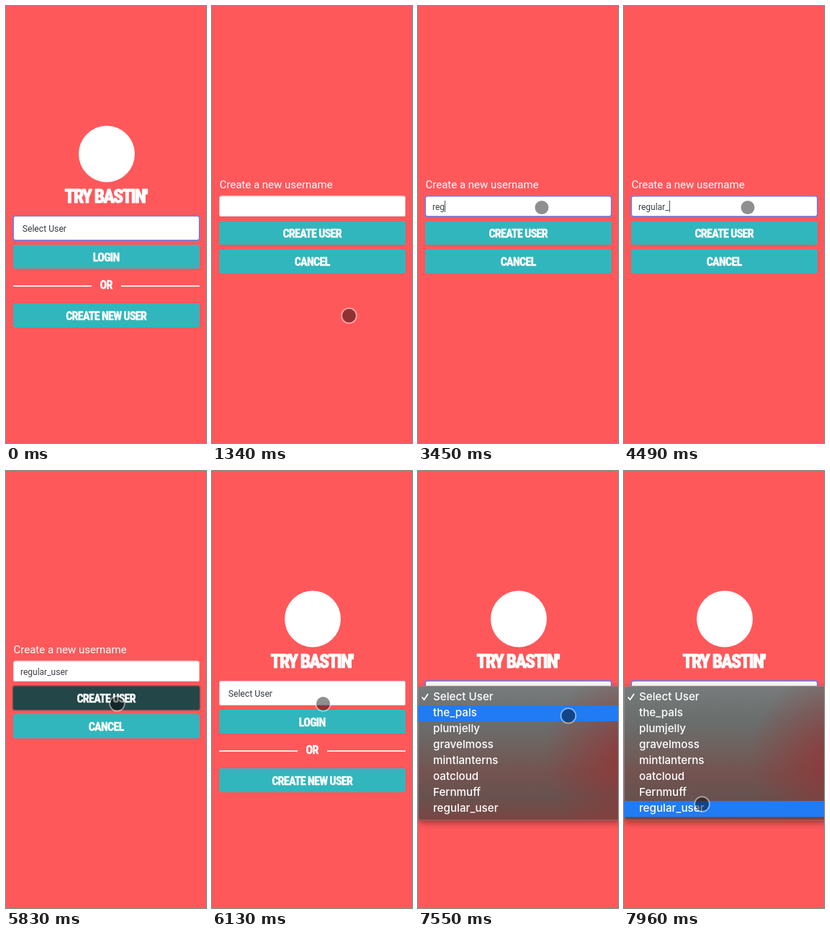
Write an HTML page with a canvas that moves like this. It is 278 by 604 pixels and loops after 8 s.

```html
<!DOCTYPE html>
<html lang="en">
<head>
<meta charset="utf-8">
<title>Login flow</title>
<style>
html, body { margin: 0; width: 100%; height: 100%; overflow: hidden; background: #ff585b; }
canvas { display: block; width: 278px; height: 604px; }
</style>
</head>
<body>
<canvas id="stage" width="278" height="604"></canvas>
<script>
const ctx = document.getElementById('stage').getContext('2d');
const LOOP = 8000;
const RED = '#ff585b', PRESSED = [35, 70, 72], IDLE = [49, 182, 189];
const LEFT = 10, WIDTH = 259;
const BODY = 'Roboto, sans-serif';
const NARROW = '"Roboto Condensed", "Open Sans Condensed", Roboto, sans-serif';

const USERNAME = 'regular_user';
const KEY_TIMES = [3120, 3300, 3450, 3630, 3720, 3900, 4080, 4190, 4670, 4850, 4940, 4940];
const OPTIONS = ['Select User', 'the_pals', 'plumjelly', 'gravelmoss', 'mintlanterns',
  'oatcloud', 'Fernmuff', USERNAME];
const ROW = 22, MENU_TOP = 297, FIRST_ROW = 302, MENU_BOTTOM = 483;

// Pointer moves: time span, then start, control and end points.
const MOVES = [
  { from: 570, to: 860, path: [[255, 470], [218, 450], [190.5, 428]] },
  { from: 1680, to: 2080, path: [[190.5, 428], [164, 355], [172, 278.5]] },
  { from: 5000, to: 5240, path: [[172, 278.5], [166, 306], [154.5, 321.5]] },
  { from: 6200, to: 6710, path: [[154.5, 321.5], [215, 352], [215.5, 321.5]] },
  { from: 7450, to: 7960, path: [[215.5, 321.5], [186, 405], [108.5, 460.5]] }
];

const clamp = v => Math.min(1, Math.max(0, v));
const ramp = (t, from, to) => clamp((t - from) / (to - from));
const smooth = u => u * u * (3 - 2 * u);
const mix = (a, b, u) => a + (b - a) * u;

function pointerAt(t) {
  const move = MOVES.filter(m => t >= m.from).pop();
  if (!move) return null;
  const u = smooth(ramp(t, move.from, move.to));
  const [a, b, c] = move.path;
  return [0, 1].map(i => mix(mix(a[i], b[i], u), mix(b[i], c[i], u), u));
}

function box(x, y, w, h, r, fill) {
  ctx.beginPath();
  ctx.roundRect(x, y, w, h, r);
  if (fill) {
    ctx.fillStyle = fill;
    ctx.fill();
  }
}

function outline(color, width) {
  ctx.lineWidth = width;
  ctx.strokeStyle = color;
  ctx.stroke();
}

function text(str, x, y, size, color = '#fff', family = BODY, weight = 400) {
  ctx.font = `${weight} ${size}px ${family}`;
  ctx.textAlign = 'left';
  ctx.fillStyle = color;
  ctx.fillText(str, x, y);
}

// Centred, tightly set heavy capitals in the narrow face.
function heading(str, cy, size, tracking, heft) {
  ctx.save();
  ctx.fontStretch = 'condensed';
  ctx.letterSpacing = `${tracking}px`;
  ctx.textAlign = 'center';
  ctx.fillStyle = '#fff';
  ctx.strokeStyle = '#fff';
  ctx.lineWidth = heft;
  ctx.lineJoin = 'round';
  ctx.font = `bold ${size}px ${NARROW}`;
  const x = 139.5 + tracking / 2, y = cy + size * 0.355;
  ctx.fillText(str, x, y);
  ctx.strokeText(str, x, y);
  ctx.restore();
}

const label = (str, cy) => heading(str, cy, 16, -0.7, 0.4);

function button(str, y, h, press = 0) {
  if (press > 0) box(LEFT - 1.5, y - 1.5, WIDTH + 3, h + 3, 4, `rgba(120,80,80,${0.75 * press})`);
  const rgb = IDLE.map((v, i) => Math.round(mix(v, PRESSED[i], press)));
  box(LEFT, y, WIDTH, h, 3, `rgb(${rgb})`);
  label(str, y + h / 2 + 0.4);
}

function field(y, h, focus) {
  box(LEFT, y, WIDTH, h, 3, '#fff');
  box(LEFT + 0.5, y + 0.5, WIDTH - 1, h - 1, 3);
  outline('#e3d5da', 1);
  if (focus > 0) {
    ctx.globalAlpha = focus;
    box(LEFT, y, WIDTH, h, 3);
    outline('#8b78cc', 2);
    ctx.globalAlpha = 1;
  }
}

function drawHome(t) {
  ctx.fillStyle = '#fff';
  ctx.beginPath();
  ctx.arc(140, 204.5, 39, 0, Math.PI * 2);
  ctx.fill();
  heading("TRY BASTIN'", 263, 25.5, -1.5, 1.2);

  field(290, 34, t < 1340 || t >= 7490 ? 1 : 0);
  text('Select User', 22.7, 312, 12.2, '#343a40');
  button('LOGIN', 330, 33);
  ctx.fillStyle = '#ffe3e3';
  ctx.fillRect(LEFT, 386, 109, 2);
  ctx.fillRect(160, 386, 109, 2);
  label('OR', 385);
  button('CREATE NEW USER', 411, 33);
  if (t >= 7130) drawMenu(t);
}

function drawForm(t) {
  text('Create a new username', 10.5, 251.5, 15);
  const focus = ramp(t, 2470, 2650) * (1 - ramp(t, 5740, 5830));
  field(262.5, 28.5, focus);

  const count = KEY_TIMES.filter(k => t >= k).length;
  const typed = USERNAME.slice(0, count);
  text(typed, 20, 282, 12, '#3c4147');
  const lastKey = count ? KEY_TIMES[count - 1] : 2470;
  const caretOn = t >= 2470 && t < 5770 && (t - lastKey) % 1000 < (count ? 500 : 540);
  if (caretOn) {
    ctx.fillStyle = '#555';
    ctx.fillRect(20 + Math.round(ctx.measureText(typed).width), 269, 1, 16);
  }

  const press = ramp(t, 5740, 5820) * (1 - ramp(t, 5890, 6030));
  button('CREATE USER', 297.5, 32.5, press);
  button('CANCEL', 336, 33.5);
}

function withStops(gradient, stops) {
  stops.forEach(([at, color]) => gradient.addColorStop(at, color));
  return gradient;
}

function drawMenu(t) {
  const height = MENU_BOTTOM - MENU_TOP;
  const shade = withStops(ctx.createLinearGradient(0, MENU_TOP, 0, MENU_BOTTOM), [
    [0, '#777b7b'], [0.25, '#6a6f6e'], [0.45, '#6e625f'], [0.65, '#735350'],
    [0.82, '#67524f'], [1, '#7a4542']
  ]);
  const glow = withStops(ctx.createRadialGradient(300, 395, 10, 300, 395, 125), [
    [0, 'rgba(150,48,48,.75)'], [1, 'rgba(150,48,48,0)']
  ]);
  ctx.save();
  ctx.shadowColor = 'rgba(0,0,0,.4)';
  ctx.shadowBlur = 10;
  ctx.shadowOffsetY = 3;
  box(0, MENU_TOP, 284, height, 5, shade);
  ctx.restore();
  box(0, MENU_TOP, 284, height, 5, glow);
  box(0.5, MENU_TOP + 0.5, 284, height - 1, 5);
  outline('rgba(190,150,150,.45)', 1);

  const hovered = Math.floor((pointerAt(t)[1] - FIRST_ROW) / ROW);
  ctx.fillStyle = '#217bf3';
  ctx.fillRect(0, FIRST_ROW + hovered * ROW, 278, ROW);
  OPTIONS.forEach((name, i) =>
    text(name, 21, 317 + i * ROW, 15.2, '#fff', 'Inter, sans-serif', 500));

  ctx.beginPath();
  ctx.moveTo(5.5, 312.5);
  ctx.lineTo(8.5, 316);
  ctx.lineTo(14, 308);
  outline('#fff', 1.8);
}

function drawPointer(t) {
  const at = pointerAt(t);
  if (!at || (t >= 4190 && t < 4490)) return;
  ctx.beginPath();
  ctx.arc(at[0], at[1], 9.6, 0, Math.PI * 2);
  ctx.fillStyle = 'rgba(0,0,0,.44)';
  ctx.fill();
  ctx.beginPath();
  ctx.arc(at[0], at[1], 10.4, 0, Math.PI * 2);
  outline('rgba(255,255,255,.45)', 1.8);
}

function frame(now) {
  const t = now % LOOP;
  ctx.fillStyle = RED;
  ctx.fillRect(0, 0, 278, 604);
  if (t >= 1340 && t < 6080) drawForm(t);
  else drawHome(t);
  drawPointer(t);
  requestAnimationFrame(frame);
}
requestAnimationFrame(frame);
</script>
</body>
</html>
```
